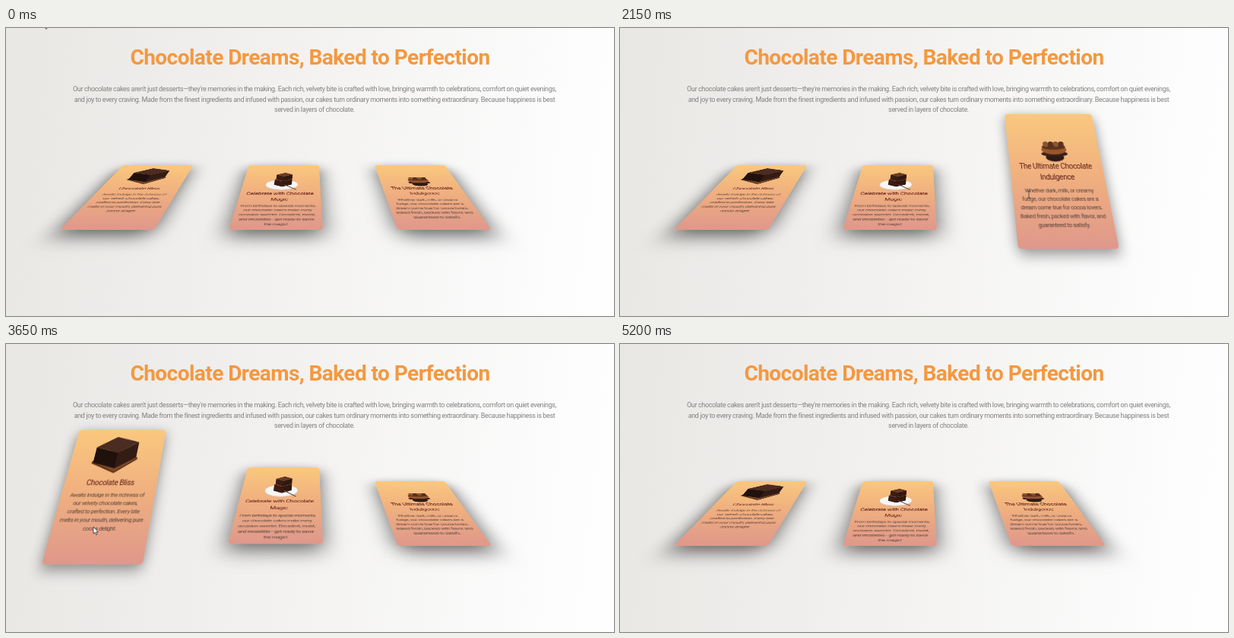
These frames come from a looping animation (800 px wide and 378 px high, 5.25 s). An HTML page:

```html
<!DOCTYPE html>
<html lang="en">
<head>
<meta charset="utf-8">
<title>Chocolate cards</title>
<style>
  html, body { margin: 0; width: 100%; height: 100%; overflow: hidden; }
  #stage {
    position: relative; width: 800px; height: 378px; overflow: hidden;
    background: linear-gradient(96deg, #e8e7e4, #f3f2f1 48%, #fefefe 96%);
    perspective: 490px; perspective-origin: 397px 55px;
    font-family: Roboto, "Open Sans", sans-serif;
  }
  svg { position: absolute; left: 0; top: 0; display: block; }
  text { text-anchor: middle; }
  .heading { font-size: 28px; font-weight: 700; letter-spacing: -.56px; fill: #f5983f; }
  .intro { font-size: 9px; letter-spacing: -.36px; fill: #838180; }
  .card {
    position: absolute; top: 136.5px; width: 131px; height: 183px; border-radius: 4px;
    background: linear-gradient(#fac87e, #f0b07f 50%, #df988b);
  }
  .title { font-size: 10.5px; letter-spacing: -.3px; fill: #5b1a14; }
  .body { font-size: 8px; letter-spacing: -.35px; fill: #57423a; }
</style>
</head>
<body>
<div id="stage">
  <svg width="800" height="378">
    <text class="heading" x="400" y="47.5">Chocolate Dreams, Baked to Perfection</text>
    <g id="intro"></g>
  </svg>
  <svg id="cursor" width="14" height="16" viewBox="-2 -2 14 16">
    <path id="arrow" d="M0 0V9L2.2 7.2 3.6 10.4 5 9.8 3.6 6.7H6.4Z" fill="#fff" stroke="#333" stroke-width=".8"/>
    <path id="beam" d="M0 0H4M2 0V9M0 9H4" fill="none" stroke="#4a4a4a" stroke-width=".9"/>
  </svg>
</div>
<script>
const LOOP = 5250, FADE = 500;

const intro = [
  "Our chocolate cakes aren't just desserts—they're memories in the making. Each rich, velvety bite is crafted with love, bringing warmth to celebrations, comfort on quiet evenings,",
  "and joy to every craving. Made from the finest ingredients and infused with passion, our cakes turn ordinary moments into something extraordinary. Because happiness is best",
  "served in layers of chocolate."
];

const oval = (fill, x, y, rx, ry = rx) => `<ellipse fill="${fill}" cx="${x}" cy="${y}" rx="${rx}" ry="${ry}"/>`;

// a solid seen from its front corner: edges run left, right and down
function block(x, y, [lx, ly], [rx, ry], h, [top, left, right]) {
  const face = (fill, d) => `<path fill="${fill}" d="M${x} ${y}l${d}z"/>`;
  return face(left, `${lx} ${ly}v${h}l${-lx} ${-ly}`) +
    face(right, `${rx} ${ry}v${h}l${-rx} ${-ry}`) +
    face(top, `${lx} ${ly}l${rx} ${ry}l${-lx} ${-ly}`);
}

const dark = ["#4b2c22", "#20110d", "#341c15"];
const brown = ["#6b3923", "#3a1c12", "#32180f"];
const wood = ["#7a4526", "#5c3119", "#5c3119"];

const slice = block(66, 62, [-35, -14], [30, -20], 3, wood) + block(66, 35, [-33, -8], [28, -16], 23, dark);

const brownies = oval("#d9d3d0", 66, 68, 27, 15) + oval("#f8f6f5", 66, 66, 27, 15) +
  block(67, 56, [-14, -6], [16, -7], 17, brown) + block(68, 40, [-13, -6], [15, -7], 15, brown) +
  '<path d="M70 66L91 82" stroke="#57504e" stroke-width="1.6"/>';

const cake = oval("#2b1a14", 66, 65, 13, 6) + oval("#36211a", 66, 60, 19, 4) +
  oval("#9a552b", 66, 54, 18, 7) + oval("#5e311d", 66, 50, 17, 4) +
  [0, 1, 2, 3].map(i => oval(i % 2 ? "#54301f" : "#8a5431", 55 + 7.5 * i, 46, 4)).join("");

// hover: [enter, leave] times in ms
const cards = [
  { art: slice, titleY: 81.7, bodyY: 98.4, title: ["Chocolate Bliss"],
    body: ["Awaits Indulge in the richness of", "our velvety chocolate cakes,", "crafted to perfection. Every bite",
      "melts in your mouth, delivering pure", "cocoa delight."],
    hover: [[150, 705], [3460, 3910]] },
  { art: brownies, titleY: 97.2, bodyY: 128.9, title: ["Celebrate with Chocolate", "Magic"],
    body: ["From birthdays to special moments,", "our chocolate cakes make every", "occasion sweeter. Decadent, moist,",
      "and irresistible—get ready to savor", "the magic!"],
    hover: [[940, 1650], [2690, 3340]] },
  { art: cake, titleY: 80.7, bodyY: 112.9, title: ["The Ultimate Chocolate", "Indulgence"],
    body: ["Whether dark, milk, or creamy", "fudge, our chocolate cakes are a", "dream come true for cocoa lovers.",
      "Baked fresh, packed with flavor, and", "guaranteed to satisfy."],
    hover: [[1958, 2350], [4250, 4580]] }
];

// pointer stops: time, x, y and whether it rests on text
const stops = [
  [0, 49, -9], [350, 118, 248], [700, 161, 225], [1450, 349, 240, true], [2150, 536, 214, true],
  [2550, 450, 362], [3150, 362, 254], [3650, 115, 240], [3850, 150, 352], [4050, 372, 334],
  [4450, 585, 235], [4780, 654, -20], [LOOP, 654, -20]
];

const $ = id => document.getElementById(id);
const clamp = v => Math.max(0, Math.min(1, v));
const lines = (list, cls, x, y, step) =>
  list.map((s, i) => `<text class="${cls}" x="${x}" y="${y + i * step}">${s}</text>`).join("");

// cubic-bezier(.25, .1, .25, 1)
function ease(x) {
  if (x <= 0 || x >= 1) return clamp(x);
  const curve = (s, a, b) => 3 * a * s * (1 - s) ** 2 + 3 * b * s * s * (1 - s) + s ** 3;
  let lo = 0, hi = 1;
  for (let i = 0; i < 20; i++) {
    const mid = (lo + hi) / 2;
    if (curve(mid, .25, .25) < x) lo = mid; else hi = mid;
  }
  return curve(lo, .1, 1);
}

const raised = (hover, t) => hover.reduce((sum, [enter, leave]) =>
  sum + ease((Math.min(t, leave) - enter) / FADE) * (1 - ease((t - leave) / FADE)), 0);

function pose({ el, hover }, t) {
  const f = 1 - raised(hover, t);
  el.style.transform = `rotateX(${76 * f}deg) translate3d(0,${-107 * f}px,${-54 * f}px)`;
  el.style.boxShadow = `0 ${2 + 10 * f}px ${9 + 25 * f}px rgba(0,0,0,${.36 + .24 * f})`;
}

function movePointer(t) {
  const i = stops.findIndex(s => s[0] > t);
  const [t0, x0, y0, text0] = stops[i - 1], [t1, x1, y1, text1] = stops[i];
  const u = (t - t0) / (t1 - t0), k = u * u * (3 - 2 * u);
  const beam = (text0 && t - t0 < 80) || (text1 && t1 - t < 80);
  $("cursor").style.transform = `translate(${x0 + (x1 - x0) * k - 2}px,${y0 + (y1 - y0) * k - 2}px)`;
  $("beam").style.display = beam ? "" : "none";
  $("arrow").style.display = beam ? "none" : "";
}

$("intro").innerHTML = lines(intro, "intro", 406, 83.3, 13.2);
cards.forEach((card, i) => {
  card.el = document.createElement("div");
  card.el.className = "card";
  card.el.style.left = 52 + 234.75 * i + "px";
  card.el.innerHTML = `<svg width="131" height="183">${card.art}` +
    lines(card.title, "title", 65, card.titleY, 15.5) +
    lines(card.body, "body", 64.5, card.bodyY, 10.95) + "</svg>";
  $("stage").insertBefore(card.el, $("cursor"));
});

const start = performance.now();
function draw(now) {
  const t = Math.max(0, now - start) % LOOP;
  cards.forEach(card => pose(card, t));
  movePointer(t);
  requestAnimationFrame(draw);
}
draw(start);
</script>
</body>
</html>
```
